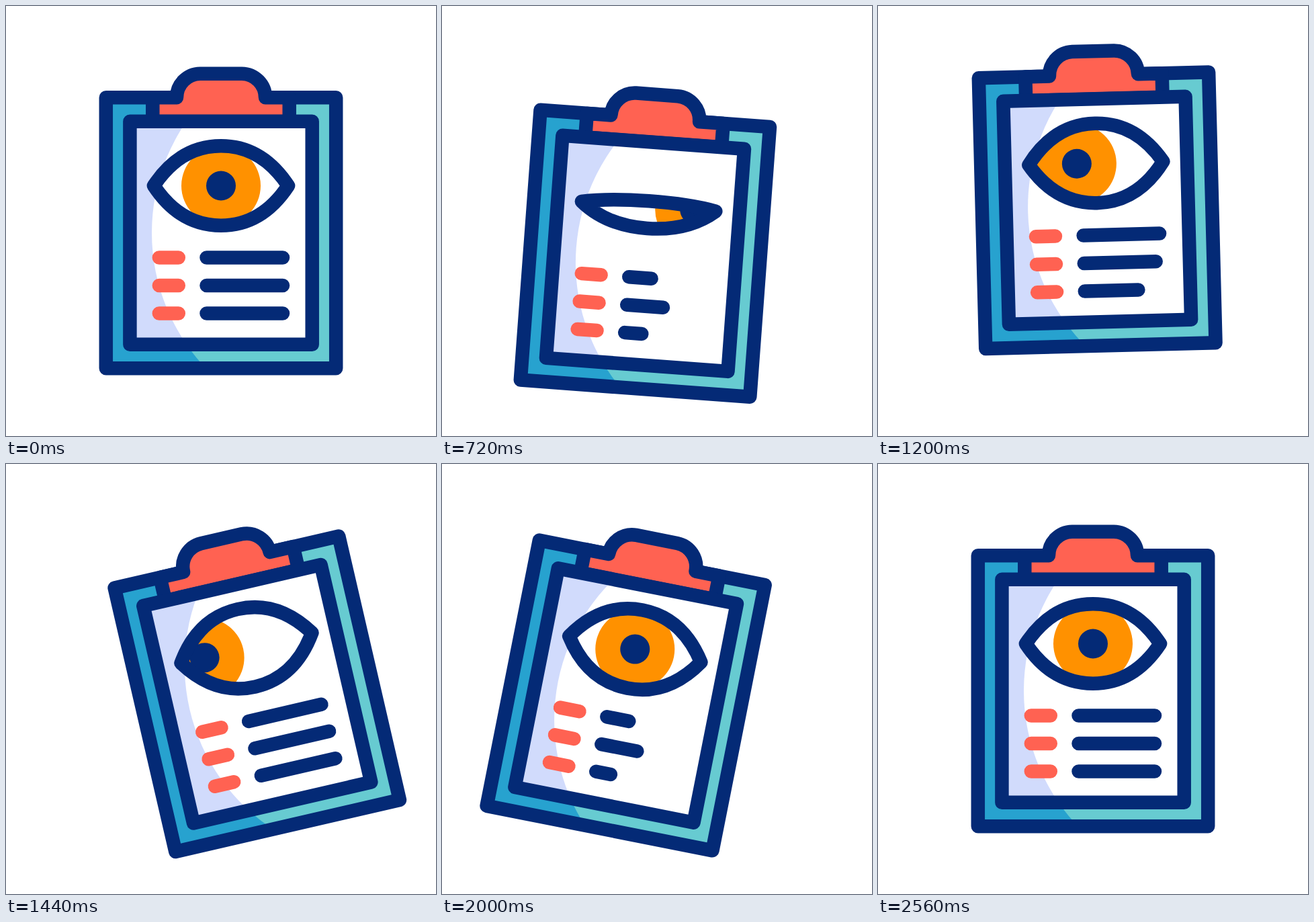
Write an HTML page that moves like this. It is 640 by 640 pixels and loops after 2.6 s.

```html
<!DOCTYPE html>
<html lang="en">
<head>
<meta charset="utf-8">
<title>Eye test clipboard</title>
<style>
  html, body { margin: 0; height: 100%; overflow: hidden; background: #fff; }
  svg { display: block; width: 100vw; height: 100vh; }
  .outline { stroke: #042a76; stroke-width: 20.5; stroke-linejoin: round; stroke-linecap: round; fill: none; }
  .label { stroke: #ff6252; }
</style>
</head>
<body>
<svg viewBox="0 0 640 640">
  <defs>
    <clipPath id="lit"><circle cx="510" cy="337.5" r="293"/></clipPath>
    <clipPath id="eyeClip"><path class="lids"/></clipPath>
    <rect id="back" x="148.8" y="136.3" width="342.4" height="402.9"/>
    <rect id="paper" x="184.4" y="171.8" width="271.3" height="332"/>
  </defs>
  <g id="board">
    <use href="#back" fill="#27a2cf"/>
    <g clip-path="url(#lit)"><use href="#back" fill="#67cbd1"/></g>
    <use href="#back" class="outline"/>
    <path class="outline" style="fill:#ff6252"
      d="M218.3 172V136.3H254A35.5 35.5 0 0 1 289 100.7H351A35.5 35.5 0 0 1 386 136.3H421.7V172Z"/>
    <use href="#paper" fill="#d1dbfc"/>
    <g clip-path="url(#lit)"><use href="#paper" fill="#fff"/></g>
    <use href="#paper" class="outline"/>
    <path class="lids" fill="#fff"/>
    <g clip-path="url(#eyeClip)">
      <g id="iris">
        <circle cx="320" cy="267.5" r="59" fill="#ff9100"/>
        <circle cx="320" cy="267.5" r="22" fill="#042a76"/>
      </g>
    </g>
    <path class="lids outline"/>
    <path id="labels" class="outline label"/>
    <path id="lines" class="outline"/>
  </g>
</svg>
<script>
const LOOP = 2600;
const [board, iris, labels, lines] =
  ['board', 'iris', 'labels', 'lines'].map(id => document.getElementById(id));
const lids = document.querySelectorAll('.lids');
const shortLengths = [33.5, 54, 22];

// Smooth step from 0 to 1 between two times
function ease(t, from, to) {
  const s = Math.min(1, Math.max(0, (t - from) / (to - from)));
  return s * s * (3 - 2 * s);
}

// Rises from 0 to 1, holds, and falls back at the same speed
function pulse(t, start, ramp, hold) {
  const fall = start + ramp + hold;
  return ease(t, start, start + ramp) - ease(t, fall, fall + ramp);
}

const tilt = t => -13.2 * ease(t, 0, 365)
  + 24.5 * (pulse(t, 365, 552, 0) + ease(t, 1470, 2022))
  - 11.3 * ease(t, 2022, 2400);
const lift = t => 49 * ease(t, 0, 595) - 95 * ease(t, 595, 1050)
  + 77 * ease(t, 1050, 1640) - 31 * ease(t, 1640, 2250);
const gaze = t => 69 * ease(t, 150, 735) - 133 * ease(t, 735, 1440) + 64 * ease(t, 1440, 2000);
const shrink = t => pulse(Math.max(0, t - 200) % 1200, 0, 400, 200);

function eyePath(closed) {
  const y = 267.5, meet = 19;
  const [top, bottom] = [-59.2, 59.2].map(open => open + (meet - open) * closed);
  const bend = h => y + h * 0.46;
  return `M220 ${y}C238 ${bend(top)} 268 ${y + top} 320 ${y + top}S402 ${bend(top)} 420 ${y}` +
    `C402 ${bend(bottom)} 372 ${y + bottom} 320 ${y + bottom}S238 ${bend(bottom)} 220 ${y}Z`;
}

// Three rounded bars under each other
const bars = (x, length) =>
  shortLengths.map((short, i) => `M${x} ${374.5 + i * 41.5}h${length(short, i)}`).join('');

function draw() {
  const t = performance.now() % LOOP;
  board.setAttribute('transform', `translate(0 ${lift(t)}) rotate(${tilt(t)} 320 99)`);
  iris.setAttribute('transform', `translate(${gaze(t)} 0)`);
  const eye = eyePath(pulse(t, 600, 200, 0));
  lids.forEach(lid => lid.setAttribute('d', eye));
  lines.setAttribute('d', bars(298.5, (short, i) => 113.5 + (short - 113.5) * shrink(t - i * 83)));
  requestAnimationFrame(draw);
}

labels.setAttribute('d', bars(227.8, () => 29));
draw();
</script>
</body>
</html>
```
